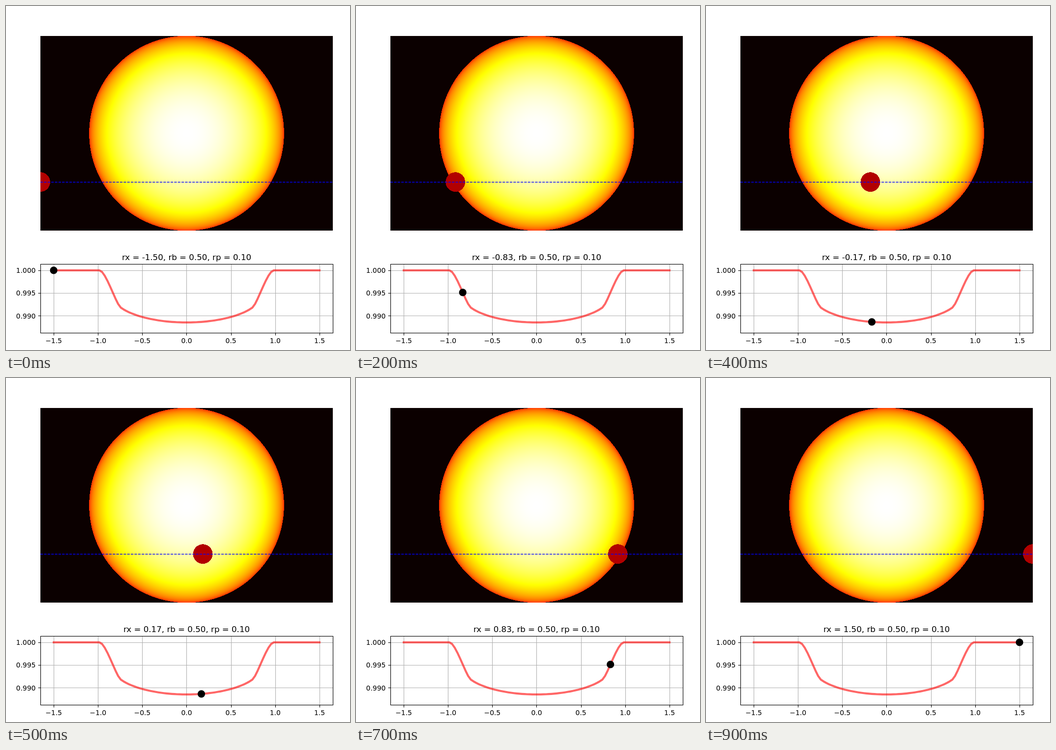
An HTML page with a canvas for the animation above (1000 ms loop, 700x700 px).

```html
<!DOCTYPE html>
<html lang="en">
<head>
<meta charset="utf-8">
<title>Transit light curve</title>
<style>
  html, body { margin: 0; width: 100%; height: 100%; overflow: hidden; background: #fff; }
  canvas { display: block; }
</style>
</head>
<body>
<canvas id="stage" width="700" height="700"></canvas>
<script>
const ctx = document.getElementById('stage').getContext('2d');
const FONT = '"DejaVu Sans", sans-serif';
const LIMB = 0.6, RB = 0.5, RP = 0.1;
const LEFT = 70, RIGHT = 665, CX = 367.5;
const SKY = { top: 61, w: 595, h: 396, cy: 259, scale: 595 / 3 };
const PLOT = { top: 525, bottom: 665 };

const clamp = v => Math.max(0, Math.min(1, v));
const plotX = x => CX + x * 595 / 3.3;
const plotY = flux => 537.9 + (1 - flux) * 9245;
const snap = v => Math.round(v - 0.01) + 0.5;

// Linear limb darkening, zero outside the disc
function brightness(r2) {
  return r2 > 1 ? 0 : 1 - LIMB * (1 - Math.sqrt(1 - r2));
}

// Black - red - yellow - white colour map
function hot(v) {
  return [0.0416 + v * 0.9584 / 0.365, (v - 0.365) / 0.381, (v - 0.746) / 0.254]
    .map(c => Math.round(255 * clamp(c)));
}

// Remaining flux with the planet at x: average brightness over its disc
function flux(x) {
  const rings = 40, spokes = 96;
  let sum = 0;
  for (let i = 0; i < rings; i++) {
    const r = RP * Math.sqrt((i + 0.5) / rings);
    for (let j = 0; j < spokes; j++) {
      const a = 2 * Math.PI * (j + 0.5) / spokes;
      sum += brightness((x + r * Math.cos(a)) ** 2 + (RB + r * Math.sin(a)) ** 2);
    }
  }
  return 1 - RP * RP * sum / (rings * spokes) / (1 - LIMB / 3);
}

const curve = Array.from({ length: 100 }, (_, i) => {
  const x = -1.5 + 3 * i / 99;
  return [plotX(x), plotY(flux(x))];
});

function eachPixel(img, paint) {
  for (let j = 0, k = 0; j < SKY.h; j++) {
    for (let i = 0; i < SKY.w; i++, k += 4) {
      const x = (LEFT + i + 0.5 - CX) / SKY.scale;
      const y = (SKY.top + j + 0.5 - SKY.cy) / SKY.scale;
      const color = paint(x, y);
      if (color) img.data.set([...color, 255], k);
    }
  }
}

const star = ctx.createImageData(SKY.w, SKY.h);
eachPixel(star, (x, y) => hot(brightness(x * x + y * y)));

function line(points, color, width) {
  ctx.strokeStyle = color;
  ctx.lineWidth = width;
  ctx.beginPath();
  points.forEach(([x, y]) => ctx.lineTo(x, y));
  ctx.stroke();
}

function text(str, x, y, size, align) {
  ctx.font = `${size}px ${FONT}`;
  ctx.textAlign = align;
  ctx.fillStyle = '#000';
  ctx.fillText(str, x, y);
}

function drawSky(rx) {
  const img = new ImageData(new Uint8ClampedArray(star.data), SKY.w, SKY.h);
  const planet = hot(0.25);
  eachPixel(img, (x, y) => (x - rx) ** 2 + (y - RB) ** 2 < RP * RP && planet);
  ctx.putImageData(img, LEFT, SKY.top);
  ctx.setLineDash([5.14, 2.22]);
  line([[LEFT, 358.5], [RIGHT, 358.5]], '#00f', 1.39);
  ctx.setLineDash([]);
}

function drawPlot(rx) {
  const { top, bottom } = PLOT;
  const xs = [-1.5, -1, -0.5, 0, 0.5, 1, 1.5], ys = [1, 0.995, 0.99];

  for (const v of xs) {
    const x = snap(plotX(v));
    line([[x, top], [x, bottom]], '#b0b0b0', 1.11);
    line([[x, bottom + 0.5], [x, bottom + 5.4]], '#000', 1.11);
    text(v.toFixed(1).replace('-', '\u2212'), plotX(v), 686, 13.89, 'center');
  }
  for (const v of ys) {
    const y = snap(plotY(v));
    line([[LEFT, y], [RIGHT, y]], '#b0b0b0', 1.11);
    line([[LEFT + 0.5, y], [LEFT - 4.4, y]], '#000', 1.11);
    text(v.toFixed(3), 60.3, Math.round(plotY(v) + 5.2), 13.89, 'right');
  }

  ctx.lineCap = 'square';
  ctx.lineJoin = 'round';
  line(curve, 'rgba(255, 0, 0, 0.6)', 4.17);
  ctx.lineCap = 'butt';
  ctx.lineJoin = 'miter';

  ctx.fillStyle = '#000';
  ctx.beginPath();
  ctx.arc(plotX(rx), plotY(flux(rx)), 7.6, 0, 2 * Math.PI);
  ctx.fill();

  ctx.lineWidth = 1.11;
  ctx.strokeStyle = '#000';
  ctx.strokeRect(LEFT + 0.5, top + 0.5, RIGHT - LEFT, bottom - top);
  text(`rx = ${rx.toFixed(2)}, rb = ${RB.toFixed(2)}, rp = ${RP.toFixed(2)}`, CX, 517, 16.67, 'center');
}

let shown = -1;
function tick() {
  const step = Math.floor(performance.now() % 1000 / 100);
  if (step !== shown) {
    shown = step;
    const rx = -1.5 + step / 3;
    ctx.fillStyle = '#fff';
    ctx.fillRect(0, 0, 700, 700);
    drawSky(rx);
    drawPlot(rx);
  }
  requestAnimationFrame(tick);
}
tick();
</script>
</body>
</html>
```
